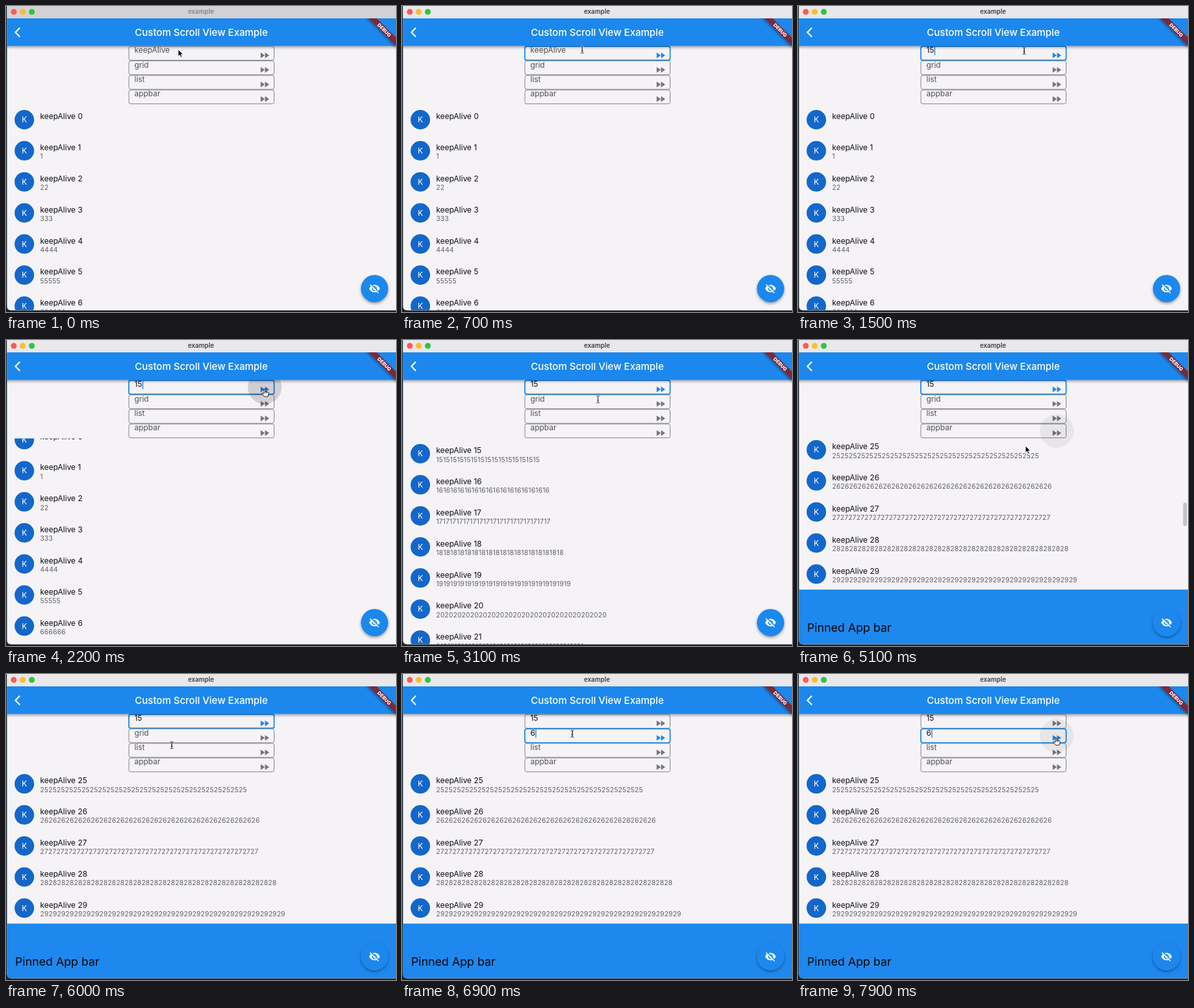
Animation of 600 by 471 pixels, one loop 8 s. Source, as an HTML page:

```html
<!DOCTYPE html>
<html lang="en">
<head>
<meta charset="utf-8">
<style>
  html, body { margin: 0; width: 100%; height: 100%; overflow: hidden; background: #14272f; }
  svg { display: block; width: 600px; height: 471px; font: 11.95px Inter, Roboto, sans-serif; }
  .title { fill: #0e0d10; }
  .sub { font-size: 10.3px; letter-spacing: .17px; fill: #626164; }
  .mid { text-anchor: middle; }
</style>
</head>
<body>
<svg viewBox="0 0 600 471">
  <defs>
    <clipPath id="window"><path d="M1.5 0H600V468.5H8Q1.5 468.5 1.5 462Z"/></clipPath>
    <clipPath id="view"><rect y="151.5" width="600" height="317"/></clipPath>
    <clipPath id="page"><rect y="19" width="600" height="450"/></clipPath>
    <filter id="shadow" x="-30%" y="-30%" width="160%" height="180%">
      <feDropShadow dx="0" dy="2" stdDeviation="2" flood-opacity=".38"/>
    </filter>
    <path id="ibeam" d="M-2.5-5.5Q0-5.5 0-4V4Q0 5.5-2.5 5.5M2.5-5.5Q0-5.5 0-4V4Q0 5.5 2.5 5.5M-1.3 1.5H1.3" fill="none"/>
  </defs>
  <rect width="600" height="471" fill="#14272f"/>
  <g clip-path="url(#window)">
    <rect width="600" height="471" fill="#f5f3f6"/>
    <g clip-path="url(#view)">
      <g id="rows"></g>
      <g id="pinned">
        <rect width="600" height="90" fill="#1e88ee"/>
        <text x="14" y="65" font-size="17.8" fill="#020508">Pinned App bar</text>
      </g>
    </g>
    <rect id="thumb" x="592.5" width="6" height="36" rx="3" fill="#c4c3c6"/>
    <g id="fields"></g>
    <circle id="splash" cx="398" r="26"/>
    <rect x="-10" y="19" width="620" height="42.5" fill="#1e88ee" filter="url(#shadow)"/>
    <rect id="titlebar" width="600" height="19"/>
    <circle cx="12" cy="9" r="4.5" fill="#fc5b57"/>
    <circle cx="25.7" cy="9" r="4.5" fill="#fcbb2f"/>
    <circle cx="39.7" cy="9" r="4.5" fill="#2ac640"/>
    <text id="name" class="mid" x="300" y="12.3" font-size="9.8" font-weight="600">example</text>
    <path d="M21.3 33.5L14.5 40.5L21.3 47.5" fill="none" stroke="#fff" stroke-width="2.1"/>
    <text class="mid" x="300.5" y="46" font-size="15" font-weight="500" fill="#fff">Custom Scroll View Example</text>
    <g clip-path="url(#page)">
      <g transform="translate(600 19) rotate(45)">
        <rect x="-32" y="21" width="64" height="9" fill="#792b3d" filter="url(#shadow)"/>
        <text class="mid" y="28.2" font-size="7.5" font-weight="800" fill="#fff">DEBUG</text>
      </g>
    </g>
    <circle cx="567" cy="435" r="21" fill="#1e88ee" filter="url(#shadow)"/>
    <g transform="translate(558 426) scale(.747)" fill="#fff">
      <path d="M1 12c1.73-4.39 6-7.5 11-7.5s9.27 3.11 11 7.5c-1.73 4.39-6 7.5-11 7.5S2.73 16.39 1 12z"/>
      <circle cx="12" cy="12" r="5" fill="#1e88ee"/>
      <circle cx="12" cy="12" r="3"/>
      <path d="M4 2L22 20" stroke="#1e88ee" stroke-width="2"/>
      <path d="M2.6 3.6L20.4 21.4" stroke="#fff" stroke-width="1.8"/>
    </g>
  </g>
  <g id="pointer" stroke-linejoin="round">
    <path id="arrow" d="M0 0V10.5L2.4 8.3L4.1 12L5.9 11.2L4.2 7.6H7.4Z" fill="#000" stroke="#fff" stroke-width=".8"/>
    <g id="beam">
      <use href="#ibeam" stroke="#fff" stroke-width="1.7"/>
      <use href="#ibeam" stroke="#222" stroke-width=".9"/>
    </g>
    <path id="hand" d="M-1 .8Q0-.6 1 .8V4.4L5 5.3Q6.5 5.7 6.2 7.5L5 12H-.6L-4 7.6Q-4.3 5.8-2.5 6.6L-1 7.8ZM1 4.5V6.5M3 5V7" fill="#fff" stroke="#111" stroke-width=".9"/>
  </g>
</svg>
<script>
const LOOP = 8000, PITCH = 47.83, FIELD_STEP = 22.4, BLUE = '#1e88ee';
const labels = ['keepAlive', 'grid', 'list', 'appbar'];
const $ = id => document.getElementById(id);

function add(parent, tag, attrs, text = '') {
  const el = document.createElementNS('http://www.w3.org/2000/svg', tag);
  set(el, attrs);
  el.textContent = text;
  return parent.appendChild(el);
}
function set(el, attrs) { for (const key in attrs) el.setAttribute(key, attrs[key]); }
const show = (el, on) => el.style.display = on ? '' : 'none';
const clamp = v => Math.max(0, Math.min(1, v));
const ramp = (t, start, length) => clamp((t - start) / length);
const ease = p => (1 - Math.cos(Math.PI * p)) / 2;
const within = (t, a, b) => t >= a && t < b;

const rows = Array.from({ length: 8 }, () => {
  const g = add($('rows'), 'g', {});
  add(g, 'circle', { cx: 28.2, cy: 24, r: 15, fill: '#1467ca' });
  add(g, 'text', { class: 'mid', x: 28.2, y: 28.3, fill: '#fff' }, 'K');
  return {
    g,
    title: add(g, 'text', { class: 'title', x: 52.5, y: 23.3 }),
    sub: add(g, 'text', { class: 'sub', x: 52.5, y: 36.6 })
  };
});

const fields = labels.map((label, i) => {
  const g = add($('fields'), 'g', { transform: `translate(0 ${i * FIELD_STEP})` });
  return {
    box: add(g, 'rect', { x: 189, y: 62, width: 223.5, height: 21.4, rx: 3, fill: 'none' }),
    text: add(g, 'text', { x: 197.5, y: 72.3 }, label),
    icon: add(g, 'path', { d: 'M4 18l8.5-6L4 6v12zm9-12v12l8.5-6L13 6z', transform: 'translate(388.8 67) scale(.747)' }),
    caret: add(g, 'rect', { y: 62, width: 1.4, height: 13.5, fill: BLUE })
  };
});

// Time, x, y of the pointer's hot spot
const path = [
  [0, 265, 67], [500, 268, 67], [1400, 348, 69], [1700, 348, 69], [2000, 398, 75],
  [2500, 398, 75], [3000, 301.5, 91.5], [3300, 301.5, 91.5], [4000, 398, 142], [4750, 398, 142],
  [5100, 350, 163], [5500, 305, 156], [6000, 255, 109.5], [6300, 262, 92], [6900, 262, 92],
  [7500, 397, 97.5], [8000, 397, 97.5]
];
function pointerAt(t) {
  const i = path.findIndex(p => p[0] > t);
  const [a, b] = [path[i - 1], path[i]];
  const p = ease(ramp(t, a[0], b[0] - a[0]));
  return [a[1] + (b[1] - a[1]) * p, a[2] + (b[2] - a[2]) * p];
}

function drawList(t) {
  const pos = 15 * ease(ramp(t, 2150, 450)) + 10.125 * ease(ramp(t, 4200, 462));
  const first = Math.floor(pos);
  rows.forEach((row, i) => {
    const n = first + i;
    show(row.g, n < 30);
    set(row.g, { transform: `translate(0 ${151 + (n - pos) * PITCH})` });
    row.title.textContent = 'keepAlive ' + n;
    row.sub.textContent = String(n).repeat(n);
  });
  set($('pinned'), { transform: `translate(0 ${151 + (30 - pos) * PITCH})` });
  const fade = (start, end) => Math.min(ramp(t, start, 200), 1 - ramp(t, end, 300));
  set($('thumb'), { y: 151 + pos * 3.95, opacity: Math.max(fade(2200, 2750), fade(4360, 5250)) });
}

function drawFields(t) {
  const focus = t < 400 ? -1 : t < 6300 ? 0 : 1;
  const typed = [t < 900 ? '' : t < 1200 ? '1' : '15', t < 6900 ? '' : '6', '', ''];
  const blink = (t + (focus ? 100 : 800)) % 1000 < 500;
  fields.forEach((f, i) => {
    const on = i === focus;
    set(f.box, { stroke: on ? BLUE : '#858487', 'stroke-width': on ? 1.8 : 1 });
    f.text.textContent = typed[i] || labels[i];
    set(f.text, { fill: typed[i] ? '#0e0d10' : '#525154' });
    set(f.icon, { fill: on ? BLUE : '#757477' });
    show(f.caret, on && blink);
    if (on) set(f.caret, { x: typed[i] ? 197.8 + f.text.getComputedTextLength() : 197.5 });
  });
}

function drawPointer(t) {
  const [x, y] = pointerAt(t);
  const overField = t >= 400 && within(x, 189, 413) && within(y, 62, 151);
  const overIcon = overField && x > 380;
  set($('pointer'), { transform: `translate(${x} ${y})` });
  show($('arrow'), !overField);
  show($('beam'), overField && !overIcon);
  show($('hand'), overIcon);

  const hover = within(t, 1900, 2700) || within(t, 3900, 5200) || t >= 7400;
  const press = within(t, 2050, 2400) || within(t, 4150, 4700);
  const row = t < 3000 ? 0 : t < 6000 ? 3 : 1;
  set($('splash'), { cy: 72.7 + row * FIELD_STEP, opacity: (hover ? 0.06 : 0) + (press ? 0.09 : 0) });
}

function draw(elapsed) {
  const t = Math.floor(elapsed % LOOP / 100) * 100;
  const active = t >= 400;
  set($('titlebar'), { fill: active ? '#e9e7e9' : '#d3d1d3' });
  set($('name'), { fill: active ? '#403f41' : '#858486' });
  drawList(t);
  drawFields(t);
  drawPointer(t);
}

const start = performance.now();
function tick() {
  draw(performance.now() - start);
  requestAnimationFrame(tick);
}
tick();
</script>
</body>
</html>
```
